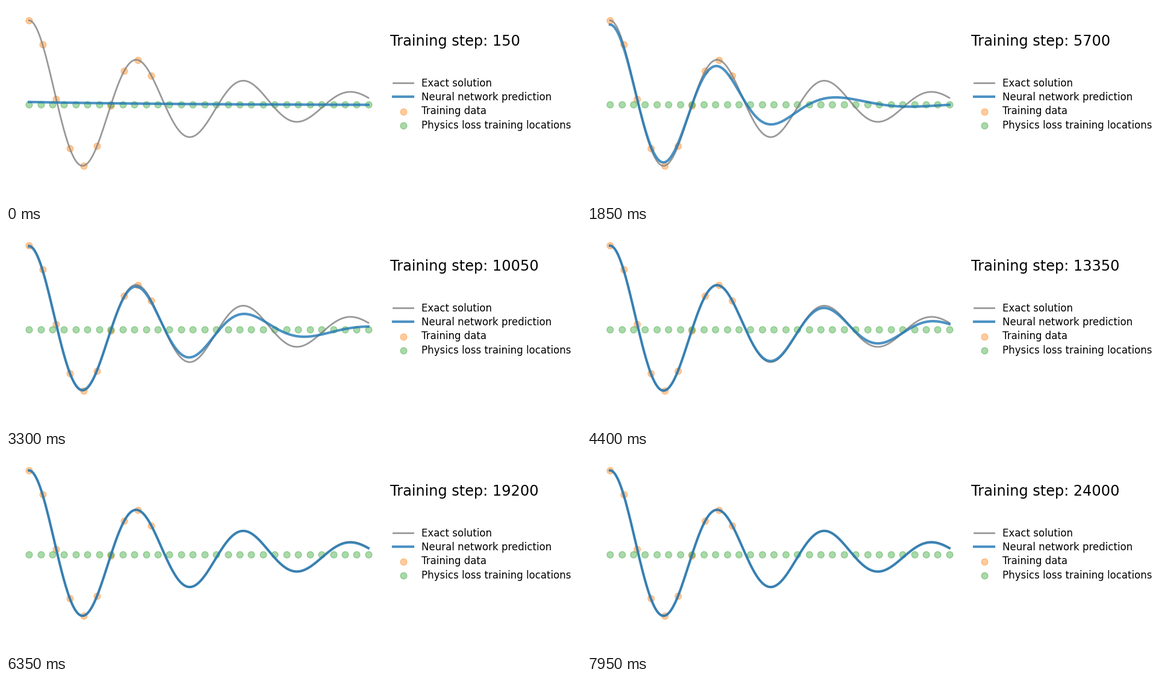
Recreate the animation shown at these times as a matplotlib script. Size 955 by 328 pixels, loop 8 s.

```python
import numpy as np
import matplotlib.pyplot as plt
from matplotlib.animation import FuncAnimation

W, H, DPI = 955, 328, 100
FRAMES, INTERVAL, STEP = 160, 50, 150
DAMP, FREQ = 2, 20


def oscillator(x):
    w = np.sqrt(FREQ**2 - DAMP**2)
    phi = np.arctan(-DAMP / w)
    return np.exp(-DAMP * x) * np.cos(phi + w * x) / np.cos(phi)


def early_fit(x, t):
    """Nearly flat line bending into a shallow wave (t in seconds)."""
    flat = .038 * np.exp(-2.2 * x) - .008
    wave = (.017 * np.cos(2 * np.pi * (x - .66) / .9)
            + .084 * np.exp(-x / .09) - .002)
    u = min(t / .9, 1)
    return (1 - u) * flat + u * wave


def late_fit(x, t):
    """Exact curve, weakened and delayed by an error that grows with x."""
    s = t - 1.85
    err = (.05 + 10.5 * np.exp(-.48 * s - .26 * s**2)) * x**4
    gain = (1 - .05 * np.exp(-s)) / (1 + err)
    lag = .062 * np.log1p(err) * err / (1 + err)
    return gain * oscillator(x - lag)


def prediction(x, t):
    g = np.clip((t - .9 - .25 * x) / .6, 0, 1)
    g = g * g * (3 - 2 * g)
    return (1 - g) * early_fit(x, t) + g * late_fit(x, t)


x = np.linspace(0, 1, 500)
y = oscillator(x)
x_phys = np.linspace(0, 1, 30)

fig = plt.figure(figsize=(W / DPI, H / DPI), dpi=DPI, facecolor="white")
ax = fig.add_axes([10 / W, 10 / H, 620 / W, 308 / H])
ax.set(xlim=(-.05, 1.05), ylim=(-1.1, 1.1))
ax.axis("off")

ax.plot(x, y, color="grey", lw=2, alpha=.8, label="Exact solution")
fit, = ax.plot(x, prediction(x, 0), color="tab:blue", lw=3, alpha=.8,
               label="Neural network prediction")
ax.scatter(x[:200:20], y[:200:20], s=60, color="tab:orange", alpha=.4,
           label="Training data")
ax.scatter(x_phys, 0 * x_phys, s=60, color="tab:green", alpha=.4,
           label="Physics loss training locations")
ax.legend(loc=(1.01, .3368), frameon=False, fontsize="large", labelspacing=.32)
title = ax.text(1.065, .7, "", fontsize="xx-large", color="k")


def update(i):
    fit.set_ydata(prediction(x, i * INTERVAL / 1000))
    title.set_text(f"Training step: {(i + 1) * STEP}")
    return fit, title


anim = FuncAnimation(fig, update, frames=FRAMES, interval=INTERVAL,
                     repeat=True, repeat_delay=0)
plt.show()
```
